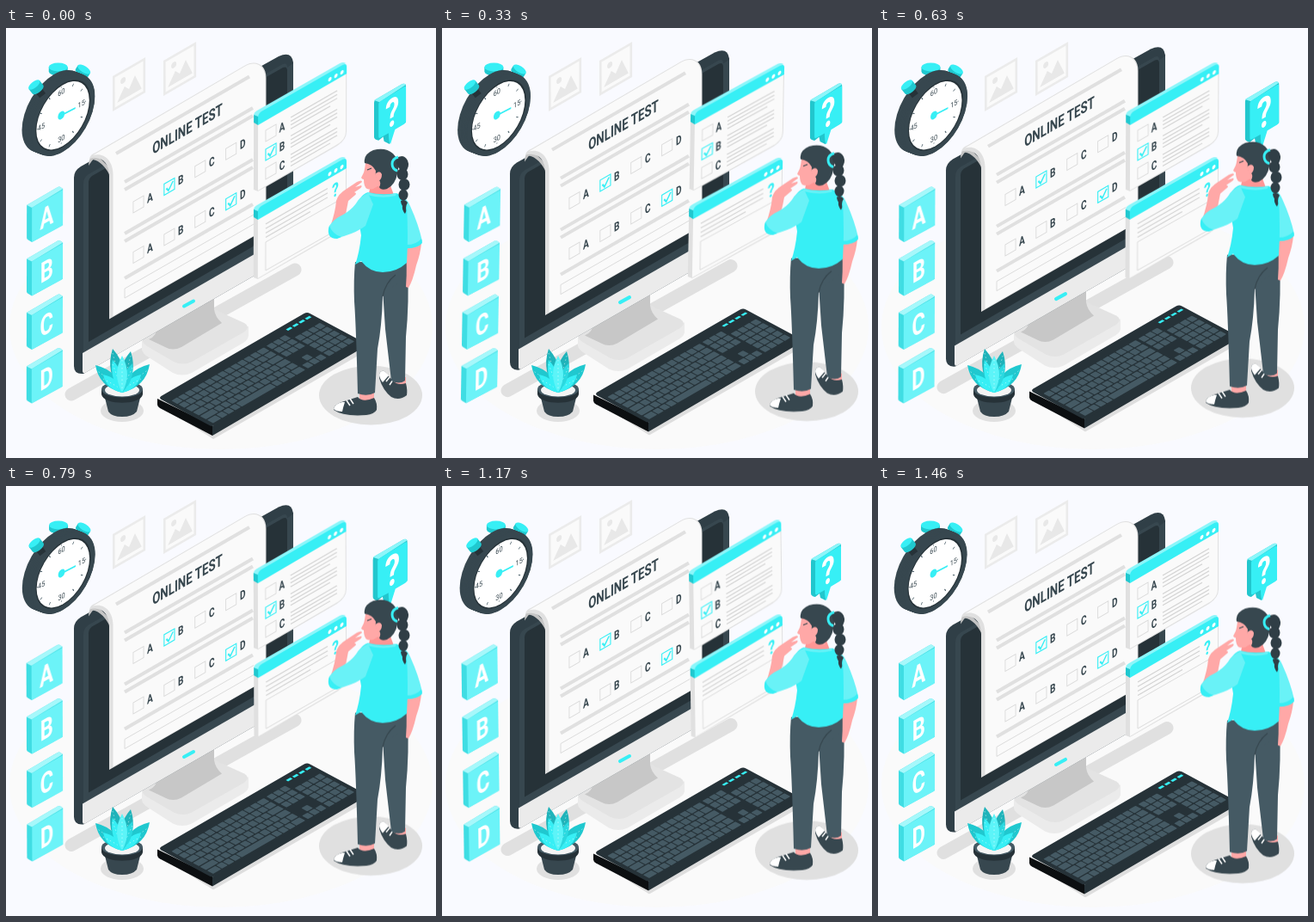
An HTML page for the animation above (1500 ms loop, 500 px wide and 500 px high).

```html
<!DOCTYPE html>
<html lang="en">
<head>
<meta charset="utf-8">
<title>Online test</title>
<style>
  html, body { margin: 0; width: 100%; height: 100%; overflow: hidden; background: #f9faff; }
  svg { display: block; width: 100vw; height: 100vh; }
  text { font-family: Roboto, Arial, sans-serif; font-weight: 700; text-anchor: middle; }
  .float, .wind, .shake, .beat { animation: 1.5s linear -35ms infinite; }
  .float { animation-name: float; }
  .wind { animation-name: wind; transform-box: fill-box; transform-origin: center; }
  .shake { animation-name: shake; }
  .beat { animation-name: beat; transform-box: fill-box; transform-origin: center; }
  @keyframes float { 0%, 100% { transform: translateY(.5px); } 50% { transform: translateY(-9.5px); } }
  @keyframes wind { 0%, 100% { transform: rotate(0deg); } 25% { transform: rotate(1deg); } 75% { transform: rotate(-1deg); } }
  @keyframes shake {
    0%, 100% { transform: translateX(0); }
    10%, 90% { transform: translateX(-1px); }
    20%, 80% { transform: translateX(2px); }
    30%, 50%, 70% { transform: translateX(-4px); }
    40%, 60% { transform: translateX(4px); }
  }
  @keyframes beat {
    0%, 30%, 40%, 60%, 100% { transform: scale(1); }
    10% { transform: scale(1.25); }
    50% { transform: scale(1.3); }
  }
</style>
</head>
<body>
<svg viewBox="0 0 500 500" xmlns="http://www.w3.org/2000/svg">
  <ellipse cx="250" cy="348" rx="246" ry="142" fill="#fafafa"/>
  <g id="pictures"></g>

  <g class="float">
    <path d="M76 426L336 281" stroke="#e0e0e0" stroke-width="15" stroke-linecap="round"/>
    <!-- stand -->
    <path d="M158 364v10q1 5 8 9l28 18q11 5 22 0l60-35q7-4 6-11v-8z" fill="#ebebeb"/>
    <path d="M161 359q-6 5 3 11l31 18q11 5 21 0l60-34q9-6 1-11l-35-16z" fill="#e3e3e3"/>
    <path d="M176 346l66-38v19q1 9 9 16l-47 28q-10 5-19 0l-19-9q10-4 10-16z" fill="#c7c7c7"/>
    <!-- screen -->
    <path d="M79 174q0-8 8-13L317 33q15-7 17 7v222L90 402q-11 1-11-9z" fill="#303f47"/>
    <path d="M90 181q0-7 6-11L322 42q5-2 5 4V241L90 378z" fill="#37474f"/>
    <path d="M96 180q0-5 4-8L322 46q5-2 5 4V231L96 365z" fill="#263238"/>
    <path d="M327 46l7-5V237l-7 4z" fill="#37474f"/>
    <path d="M89 378L334 237v25L92 401q-3 1-3-2z" fill="#ebebeb"/>
    <path d="M207 323.5l11-6" stroke="#37eff5" stroke-width="4" stroke-linecap="round"/>
    <!-- paper -->
    <path d="M96 160q0-11 8-14l18 18v10q-9-19-21-21z" fill="#c4c4c4"/>
    <path d="M97 152q1-5 7-7L277 44c13-8 25.500-2 25.500 14V234L120 338.500V172c0-15-9-24-23-20z" fill="#e0e0e0"/>
    <path d="M101 148L277 45c13-8 24.500-2 24.500 14V234L124.500 335V170c0-15-10-26-23.500-22z" fill="#fafafa"/>
    <g id="paper"></g>
    <!-- keyboard -->
    <path d="M178 438l63 40 172-99-8-10z" fill="#dedede"/>
    <path d="M176 431v7q0 2 3 4l61 32v-12z" fill="#0c0f11"/>
    <path d="M240 463v11l171-100q2-1 2-4v-9z" fill="#263238"/>
    <g id="keys" transform="matrix(.865 -.5 .875 .47 177 430)">
      <rect width="200" height="72" rx="4" fill="#263238"/>
    </g>
  </g>

  <g id="plant"></g>
  <g id="cards" class="wind"></g>
  <g id="windows" class="wind"></g>

  <g class="shake">
    <g id="watch"></g>
  </g>

  <g class="beat">
    <path d="M429 88q0-3 2-4l29-17q4-1 4 2v40l-13 8-5 16-6-3-1-5-5 4q-5-1-5-4z" fill="#22c6cd"/>
    <path d="M429 85l31-18q3-1 4 1l-29 19z" fill="#8cf6fa"/>
    <path d="M434 89q0-2 2-3l26-16q2-1 2 1v37q0 2-2 3l-10 6-5 16q-2-2-2-12l-9 5q-2 1-2-1z" fill="#37eff5"/>
    <g id="ask"></g>
  </g>

  <g class="float">
    <ellipse cx="424" cy="427" rx="60" ry="34.500" fill="#e0e0e0"/>
    <!-- far leg -->
    <path d="M449 406h16v13h-14z" fill="#ffa8a7"/>
    <path d="M434 403q1-5 6-4 5 7 10 11 5 6 15 3 2 8 1 14-9 7-18 2-10-8-14-22z" fill="#37474f"/>
    <path d="M434 403q1-5 6-4l5 5-7 8q-4-5-4-9z" fill="#fff"/>
    <path d="M446 406l-4 5m8-2l-4 6" stroke="#fff" stroke-width="1.500"/>
    <path d="M437 288l30-17q2 50-2 88l-1 51q-7 5-16 0l-7-60z" fill="#455a64"/>
    <!-- near leg -->
    <path d="M411 420h17v13q-9 6-17 1z" fill="#ffa8a7"/>
    <path d="M381 444q0-6 9-9l19-6q6 7 19 1 4 6 3 14-3 5-12 6-27 2-38-6z" fill="#37474f"/>
    <path d="M381 443q1-6 10-8l3 0q-2 6-3 11-7 0-10-3z" fill="#fff"/>
    <path d="M396 433l4 6m0-8l4 6" stroke="#fff" stroke-width="1.500"/>
    <path d="M406 272l61 0q0 19-13 26-10 5-16 14-1 35-6 61l-3 51q-9 5-20 1-2-80-4-107-1-25 1-46z" fill="#455a64"/>
    <path d="M438 312q3-16 15-25" stroke="#37474f" stroke-width="1.200" fill="none"/>
    <!-- far arm -->
    <path d="M464 250l19 0q-1 12-6 26-4 18-9 26l-3-1q2-25-1-51z" fill="#ffa8a7"/>
    <path d="M455 194q11 2 15 13 10 22 14 41-6 9-21 8l-8-25z" fill="#69f2f7"/>
    <path d="M463 252q13 1 20-7l1 5q-6 7-21 6z" fill="#37eff5"/>
    <!-- neck and torso -->
    <path d="M425 178h20l6 16-16 4-13-6z" fill="#ff9695"/>
    <path d="M421 191q16 4 33 1 10 4 12 15 2 35 0 66-12 11-28 11-15 0-25-13l-7 4q5-14 7-34l-5-30q2-17 13-20z" fill="#37eff5"/>
    <path d="M421 191q15 6 33 1l-1 3q-16 4-33-1z" fill="#69f2f7"/>
    <!-- near arm -->
    <path d="M377 231q6-17 7-30 2-8 12-14l12-8q6-3 6 0l-8 6 7-2q2 1-2 4l-6 4q4 1 0 4l-7 6q-3 18-9 31z" fill="#ffa8a7"/>
    <path d="M421 192q-10 4-14 12-6 8-15 13-11 5-16 13-3 8 1 12 5 4 16 0 16-5 25-12l9-25z" fill="#69f2f7"/>
    <path d="M376 230q4 10 14 13l-5 2q-7 0-9-4-2-5 0-11z" fill="#37eff5"/>
    <!-- head -->
    <path d="M418 157q-1 8-2 11l-3 6q1 2 3 2 0 9 4 11 6 2 12-3l13 4 4-22-16-15z" fill="#ffa8a7"/>
    <path d="M420 165l5-2" stroke="#37474f" stroke-width="1.300"/>
    <path d="M417 157q-2-10 10-15 14-4 23 4 9 9 5 23-2 13-12 18-7 2-9-2 3-6-1-9-4-3-3-10-4-8-13-9z" fill="#37474f"/>
    <path d="M430 169q5-4 7 1 0 6-4 8-4-3-3-9z" fill="#ffa8a7"/>
    <g fill="#303e46">
      <path d="M453 152q9-7 14 2 3 7-3 14-9-2-11-16z"/>
      <ellipse cx="461" cy="170" rx="6.500" ry="7"/>
      <ellipse cx="463" cy="182" rx="6.500" ry="7"/>
      <ellipse cx="462" cy="194" rx="5.500" ry="6.500"/>
      <path d="M459 201q5-3 8 2-2 3-2 6 1 4-1 7-4-5-3-9-2-3-2-6z"/>
    </g>
    <path d="M456 150q-7 2-7 8 0 6 6 8" fill="none" stroke="#37eff5" stroke-width="3"/>
  </g>
</svg>

<script>
  const cyan = '#37eff5', deep = '#20c8cf', ink = '#37474f', grey = '#e0e0e0';
  const add = (id, parts) => document.getElementById(id).insertAdjacentHTML('beforeend', parts.flat(9).join(''));
  const range = (n, fn) => Array.from({ length: n }, (_, i) => fn(i));

  // Things lying on the vertical plane that rises to the right
  const iso = (x, y, body, run = .866) =>
    `<g transform="matrix(${run} ${-run * .577} 0 1 ${x} ${y})">${[body].flat(9).join('')}</g>`;
  // Lettering is seen a little more edge-on, which gives a narrow face
  const label = (x, y, str, size, fill = ink) =>
    iso(x, y, `<text y="${size * .355}" font-size="${size}" fill="${fill}">${str}</text>`, .72);
  const line = (x, y, len, width, color = grey) =>
    `<path d="M${x} ${y}l${len} ${-len * .577}" stroke="${color}" stroke-width="${width}"/>`;
  const box = (x, y, on) => iso(x, y, [
    `<rect x="-7" y="-6.500" width="14" height="13" fill="#fafafa" stroke="${on ? cyan : '#d9d9d9'}" stroke-width="${on ? 1.3 : 1}"/>`,
    on ? `<path d="M-4 0l3 4 6-8" fill="none" stroke="${cyan}" stroke-width="2"/>` : ''
  ]);

  add('pictures', [[124, 56], [183, 38]].map(([x, y]) => iso(x, y, [
    '<rect width="44" height="41" fill="#ebebeb"/>',
    '<rect x="3" y="3" width="38" height="35" fill="#fafafa"/>',
    '<path d="M6 34l10-14 6 6 8-12 9 20z" fill="#e8e8e8"/>',
    '<circle cx="14" cy="12" r="3.500" fill="#e8e8e8"/>'
  ])));

  const row = (y, checked) => [...'ABCD'].map((c, i) => [
    box(154 + i * 35.9, y - i * 20.6, i === checked),
    label(167.3 + i * 36, y - 8 - i * 20.8, c, 14)
  ]);
  add('paper', [
    line(128, 146, 155, 4),
    label(211, 117, 'ONLINE TEST', 18.5),
    line(138, 179, 149, 4), line(138, 188, 149, 4),
    row(205, 1),
    line(138, 239, 149, 4), line(138, 248, 149, 4),
    row(263.5, 3),
    line(138, 291, 149, 4),
    '<path d="M288 217L138 303v11l150-86" fill="none" stroke="#dcdcdc"/>'
  ]);

  // Keyboard
  const key = (u, v, w) => `<rect x="${u}" y="${v}" width="${w}" height="8" rx="1" fill="#455a64"/>`;
  const first = [7.6, 7.6, 11, 13, 17, 11];
  add('keys', [
    first.map((w, r) => {
      const v = 12.5 + r * 9.5, keys = [key(5, v, w)];
      let u = 6.2 + w;
      while (u < 126) {
        let k = r === 5 && u > 36 && u < 46 ? 46 : 7.6;
        if (u + k + 8.8 > 129) k = 129 - u;
        keys.push(key(u, v, k));
        u += k + 1.2;
      }
      const nav = [3, 3, 3, 0, 1, 3][r];
      range(nav, i => keys.push(key(132.5 + (nav === 1 ? 1 : i) * 8.8, v, 7.6)));
      if (r) range(4, i => keys.push(key(161 + i * 8.8, v, 7.6)));
      return keys;
    }),
    range(4, i => `<rect x="${165 + i * 8.5}" y="6.500" width="6" height="3" fill="${cyan}"/>`)
  ]);

  // Plant
  const leaf = (x, y, spread, fill) => {
    const mx = (135 + x) / 2, my = (y + 424) / 2;
    const dx = (424 - y) * spread, dy = (x - 135) * spread;
    return `<path d="M135 424Q${mx - dx * 1.2} ${my - dy} ${x} ${y}Q${mx + dx * 1.2} ${my + dy} 135 424z" fill="${fill}"/>
      <path d="M${x} ${y + 5}L135 420" stroke="#fff" stroke-width=".700" stroke-dasharray="1.500 3" opacity=".7"/>`;
  };
  add('plant', [
    '<ellipse cx="135" cy="445" rx="25" ry="13" fill="#e0e0e0"/>',
    '<path d="M114 426l5 20q4 6 16 6t17-6l5-20z" fill="#37474f"/>',
    '<path d="M111 420v6c2 13 46 13 48 0v-6z" fill="#263238"/>',
    '<ellipse cx="135" cy="420" rx="24" ry="9.500" fill="#455a64"/>',
    '<ellipse cx="135" cy="421" rx="20" ry="7.500" fill="#f4f4f4"/>',
    leaf(124, 373, .24, '#1fb3ba'), leaf(145, 376, .24, '#1fb3ba'),
    leaf(104, 392, .3, deep), leaf(167, 391, .3, deep),
    leaf(113, 403, .3, cyan), leaf(157, 403, .3, cyan),
    leaf(124, 386, .22, cyan), leaf(147, 390, .22, '#2bd9e0'),
    leaf(135, 381, .23, '#5cf4f8')
  ]);

  // Answer cards
  add('cards', [...'ABCD'].map((c, i) => `<g transform="translate(0 ${i * 62.5})">
    <path d="M24 206l36-21q2-1 3 0l3 2v42l-36 20-5-3q-1-1-1-2z" fill="#3fdde3"/>
    <path d="M24 206l36-21q2-1 3 0l3 2-36 22z" fill="#a6f8fb"/>
    <path d="M30 209l36-21v40q0 1-1 2l-35 19z" fill="#6cf3f8"/>
    ${label(47.3, 219, c, 33, '#fff')}</g>`));

  // Floating windows
  const pane = (y, h, body) => `<g transform="translate(0 ${y})">
    <path d="M288 12v${h}l5 2 92-53q11-7 11-17v-${h - 9}z" fill="#e0e0e0"/>
    <path d="M293 14v${h - 1}l91-53q11-6 11-16v-${h - 9}z" fill="#fafafa"/>
    <path d="M288 12V4q0-4 4-6l96-55q4-2 7 0z" fill="#8cf6fa"/>
    <path d="M288 3v9l5 3V5z" fill="${deep}"/>
    <path d="M293 15V6q0-4 4-7l94-54q5-3 5 2v8z" fill="${cyan}"/>
    ${range(3, i => iso(376.5 + i * 7, -38.5 - i * 4, '<circle r="2.300" fill="#fff"/>')).join('')}
    ${body.flat(9).join('')}</g>`;
  add('windows', [
    pane(98, 78, [
      [...'ABC'].map((c, i) => [box(308, 24 + i * 22, i === 1), label(321, 17 + i * 22.3, c, 14)]),
      range(12, i => line(331, 6 + i * 4.4 + Math.floor(i / 4) * 4, i % 4 === 3 ? 46 : 54, 1.1, '#d2d2d2'))
    ]),
    pane(208, 70, [
      range(4, i => line(302, 20 + i * 5.2, i === 3 ? 52 : 72, 1.1, '#d2d2d2')),
      '<path d="M302 41l84-48v33l-84 48z" fill="none" stroke="#dcdcdc"/>',
      label(383, -20, '?', 22, cyan)
    ])
  ]);

  add('ask', [label(449, 98, '?', 43, '#fff')]);

  // Stopwatch
  const disc = (x, y, r, fill) => iso(x, y, `<circle r="${r}" fill="${fill}"/>`);
  const polar = (deg, r) => {
    const a = deg * Math.PI / 180;
    return [Math.sin(a) * r, -Math.cos(a) * r];
  };
  const knob = (x, y, turn, w, h) => `<g transform="translate(${x} ${y}) rotate(${turn})">
    <rect x="${-w * .55}" y="2" width="${w * 1.1}" height="${h + 7}" fill="#263238"/>
    <path d="M${-w} 0v${h}a${w} ${w * .45} 0 0 0 ${2 * w} 0V0z" fill="${deep}"/>
    <ellipse rx="${w}" ry="${w * .45}" fill="${cyan}"/></g>`;
  add('watch', [
    knob(91, 48, 32, 8.5, 5),
    knob(61, 45.5, 0, 11, 5),
    range(9, i => disc(56 + i * 1.3, 97 + i * .5, 43, ink)),
    knob(33, 66, -38, 8, 7),
    disc(66.5, 101, 42.5, ink),
    disc(66.5, 101.5, 37, '#263238'),
    disc(66.3, 101.7, 35.5, '#fff'),
    iso(64.5, 101.5, [
      range(12, i => {
        const [x, y] = polar(i * 30, 33), [p, q] = polar(i * 30, i % 3 ? 30 : 32);
        return `<path d="M${x} ${y}L${p} ${q}" stroke="#455a64"/>`;
      }),
      ['60', '15', '30', '45'].map((n, i) => {
        const [x, y] = polar(i * 90, 27);
        return `<text x="${x}" y="${y + 3}" font-size="8.500" style="font-weight:400" fill="${ink}">${n}</text>`;
      }),
      `<path d="M0 0L19 1" stroke="${cyan}" stroke-width="2"/><circle r="4.500" fill="${cyan}"/>`
    ])
  ]);
</script>
</body>
</html>
```
